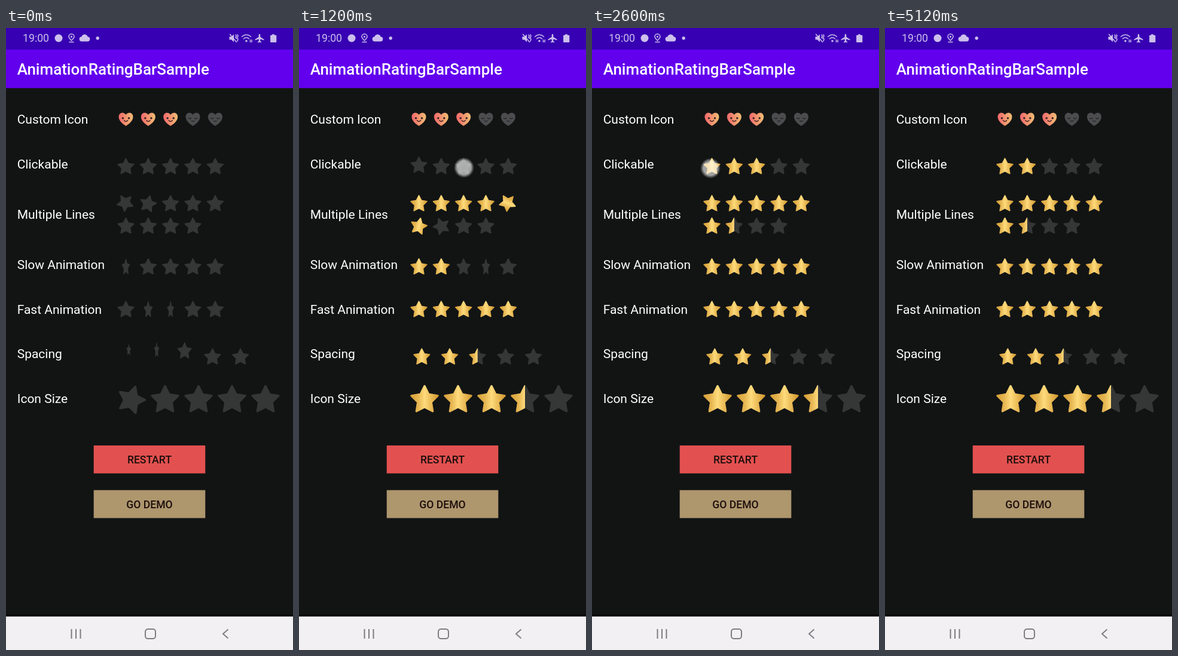
An HTML page that plays this animation: 480x1040 px, repeating every 5160 ms.

```html
<!DOCTYPE html>
<html lang="en">
<head>
<meta charset="utf-8">
<title>Rating bars</title>
<style>
html, body { margin: 0; width: 100%; height: 100%; overflow: hidden; background: #121414; }
svg { display: block; width: 480px; height: 1040px; }
text { font-family: Roboto, "Noto Sans", sans-serif; fill: #fff; }
.label { font-size: 21px; }
.title { font-size: 26px; font-weight: 500; }
.button { font-size: 17.6px; font-weight: 500; fill: #1c0e0c; text-anchor: middle; }
.clock { font-size: 17.7px; fill: #cdbfec; }
</style>
</head>
<body>
<svg id="stage" viewBox="0 0 480 1040">
  <defs>
    <linearGradient id="gold">
      <stop offset="0" stop-color="#d9a23a"/>
      <stop offset=".25" stop-color="#e5b550"/>
      <stop offset=".5" stop-color="#ffdb7c"/>
      <stop offset=".75" stop-color="#e9bb56"/>
      <stop offset="1" stop-color="#d39a32"/>
    </linearGradient>
    <linearGradient id="warm">
      <stop offset="0" stop-color="#f2686c"/>
      <stop offset="1" stop-color="#f0bd72"/>
    </linearGradient>
    <radialGradient id="glow">
      <stop offset="0" stop-color="#fff" stop-opacity=".58"/>
      <stop offset=".68" stop-color="#fff" stop-opacity=".62"/>
      <stop offset=".78" stop-color="#fff" stop-opacity=".42"/>
      <stop offset="1" stop-color="#fff" stop-opacity="0"/>
    </radialGradient>
    <clipPath id="half"><rect x="-20" y="-20" width="20" height="40"/></clipPath>
    <path id="heart" d="M0 11.5C-3.5 9.5-12 3.5-12-3.8C-12-8-9-10.5-6-10.5C-3.3-10.5-1.2-9.2 0-7.2C1.2-9.2 3.3-10.5 6-10.5C9-10.5 12-8 12-3.8C12 3.5 3.5 9.5 0 11.5Z"/>
    <g id="awake">
      <use href="#heart" fill="url(#warm)"/>
      <g fill="#3a2024"><circle cx="-5" cy="-1.6" r="1.7"/><circle cx="5" cy="-1.6" r="1.7"/></g>
      <path d="M-3 2.2Q0 5.8 3 2.2" fill="none" stroke="#3a2024" stroke-width="1.4" stroke-linecap="round"/>
    </g>
    <g id="asleep">
      <use href="#heart" fill="#4c4c4f"/>
      <path d="M-7.2-1.6Q-5 .4-2.8-1.6M2.8-1.6Q5 .4 7.2-1.6M-2.2 3Q0 4.8 2.2 3" fill="none" stroke="#222324" stroke-width="1.2" stroke-linecap="round"/>
    </g>
  </defs>

  <rect width="480" height="1040" fill="#121414"/>
  <rect width="480" height="36" fill="#3700b3"/>
  <rect y="36" width="480" height="64.5" fill="#6200ee"/>
  <text class="title" x="18.7" y="78">AnimationRatingBarSample</text>

  <text class="clock" x="28" y="23.3">19:00</text>
  <g fill="#cdbfec">
    <circle cx="88" cy="17" r="6.5"/>
    <path d="M127 22.5a4 4 0 0 1-.6-8a5.4 5.4 0 0 1 10.2 0a4 4 0 0 1-.6 8Z"/>
    <circle cx="153.2" cy="17" r="2.7"/>
    <path d="M373.5 14.5h3.5l4-4v13l-4-4h-3.5Z"/>
    <path d="M424 10c1 0 1.3 1 1.3 2v3l6.2 4v1.6l-6.2-2v3.4l1.8 1.4v1.2l-3.1-.9l-3.1.9v-1.2l1.8-1.4v-3.4l-6.2 2v-1.6l6.2-4v-3c0-1 .3-2 1.3-2Z"/>
    <path d="M445 10.500h4v1.500h2.500q.8 0 .8.800v10.400q0 .8-.8.800h-8.600q-.8 0-.8-.8v-10.400q0-.8.8-.800h2.100Z"/>
    <circle cx="402" cy="21.800" r="1.700"/>
    <circle cx="109.500" cy="14.500" r="1.500"/>
  </g>
  <g fill="none" stroke="#cdbfec" stroke-width="1.500" stroke-linecap="round">
    <path d="M109.500 21C106 17.500 105 16 105 14.500a4.500 4.500 0 0 1 9 0C114 16 113 17.500 109.500 21ZM106 23.500h7"/>
    <path d="M374.500 10.500l11 13M384 11.500l1.500 2l-1.500 2l1.500 2M387 11l1 2l-1 3l1 3l-1 3"/>
    <path d="M394.500 14.500q7.500-6.500 15 0M397.500 18q4.500-4 9 0M408.500 20v3.500M411 20v3.500" />
  </g>

  <g id="labels"></g>
  <g id="icons"></g>

  <rect x="146.700" y="698" width="186.600" height="46.700" fill="#e25150"/>
  <text class="button" x="240" y="728">RESTART</text>
  <rect x="146.700" y="772.700" width="186.600" height="46.700" fill="#ae966d"/>
  <text class="button" x="240" y="802.600">GO DEMO</text>

  <rect y="980" width="480" height="4" fill="#0c080d"/>
  <rect y="984" width="480" height="56" fill="#f2f0f3"/>
  <g fill="none" stroke="#7d7d80" stroke-width="2">
    <path d="M109.500 1005v16M117 1005v16M124.500 1005v16M371.500 1005.500l-8.500 7.500l8.500 7.500"/>
    <rect x="233" y="1005" width="17" height="16" rx="4.500"/>
  </g>
  <circle id="touch" r="17" fill="url(#glow)"/>
</svg>
<script>
const LOOP = 5160, STEP = 40;
const { PI, sin, cos, min, max, floor } = Math;
const clamp = v => min(1, max(0, v));
const smooth = p => 0.5 - 0.5 * cos(PI * clamp(p));
const byId = id => document.getElementById(id);

function add(parent, tag, attrs, text) {
  const el = document.createElementNS('http://www.w3.org/2000/svg', tag);
  for (const key in attrs) el.setAttribute(key, attrs[key]);
  if (text) el.textContent = text;
  parent.append(el);
  return el;
}

// Each effect maps the time since a star's start to its pose.
const effects = {
  spin(e) {
    if (e >= 1000) return { gold: true };
    return { turn: 360 * ((e % 500) / 500) ** 3, gold: e > 500 };
  },
  spinOnce(e) {
    return { turn: 360 * clamp(e / 440) ** 3, gold: e > 260 };
  },
  flip(e, span) {
    return { width: Math.abs(cos(PI * clamp(e / span))), gold: e > span };
  },
  jump(e) {
    const dip = sin(PI * clamp((e - 170) / 320)) ** 2;
    const pop = sin(PI * clamp((e - 810) / 200));
    return {
      lift: 11.5 * (smooth(e / 170) - smooth((e - 810) / 110)),
      width: Math.abs(cos(PI * clamp((e - 50) / 450))),
      scale: 1 - 0.3 * dip + 0.27 * pop,
      gold: e > 830
    };
  }
};

const rows = [
  { y: 231, effect: 'jump', delay: 200, taps: true },
  { y: 293, count: 9, rating: 6.5, effect: 'spin', start: -340, delay: 175 },
  { y: 398.7, rating: 5, effect: 'flip', start: -295, delay: 400, span: 860 },
  { y: 470, rating: 5, effect: 'flip', start: -225, delay: 70, span: 230 },
  { y: 549.2, x: 205.3, gap: 46.7, rating: 2.5, effect: 'jump', start: -330, delay: 100 },
  { y: 620, x: 210, gap: 56, size: 1.68, rating: 3.5, effect: 'spinOnce', start: -160, delay: 200 }
];

const taps = [
  { at: 1150, x: 276, y: 233.5, rating: 3 },
  { at: 2640, x: 198, y: 234.5, rating: 1 },
  { at: 3885, x: 240.5, y: 229.5, rating: 2 }
];

const starPath = 'M' + Array.from({ length: 10 }, (_, i) => {
  const r = i % 2 ? 7 : 13.8, a = i * PI / 5;
  return (r * sin(a)).toFixed(2) + ' ' + (1.2 - r * cos(a)).toFixed(2);
}).join('L') + 'Z';

function makeStar(row, i) {
  const { x = 200.5, gap = 37.35 } = row;
  const g = add(byId('icons'), 'g', {});
  const shape = (parent, paint) => add(parent, 'path', {
    d: starPath, fill: paint, stroke: paint, 'stroke-width': 2, 'stroke-linejoin': 'round'
  });
  shape(g, '#353636');
  const clip = row.rating - i === 0.5 ? { 'clip-path': 'url(#half)' } : {};
  const gold = add(g, 'g', clip);
  shape(gold, 'url(#gold)');
  return { row, i, g, gold, x: x + gap * (i % 5), y: row.y + 37.5 * floor(i / 5) };
}

const labels = [
  ['Custom Icon', 160], ['Clickable', 235], ['Multiple Lines', 319], ['Slow Animation', 403],
  ['Fast Animation', 477.5], ['Spacing', 552], ['Icon Size', 627]
];
for (const [text, y] of labels) add(byId('labels'), 'text', { class: 'label', x: 18.7, y }, text);

for (let i = 0; i < 5; i++) {
  add(byId('icons'), 'use', {
    href: i < 3 ? '#awake' : '#asleep', transform: `translate(${200.5 + 37.35 * i} 152.3)`
  });
}

const stars = rows.flatMap(row => Array.from({ length: row.count || 5 }, (_, i) => makeStar(row, i)));
const touch = byId('touch');

function poseOf({ row, i }, t) {
  const run = row.taps ? taps.findLast(tap => t >= tap.at) : row;
  if (!run || i >= run.rating) return {};
  const e = t - (row.taps ? run.at : run.start) - i * row.delay;
  return e > 0 ? effects[row.effect](e, row.span) : {};
}

function draw(t) {
  for (const star of stars) {
    const { turn = 0, width = 1, scale = 1, lift = 0, gold = false } = poseOf(star, t);
    const s = scale * (star.row.size || 1);
    star.g.setAttribute('transform',
      `translate(${star.x} ${star.y - lift}) rotate(${turn}) scale(${s * max(width, 0.04)} ${s})`);
    star.gold.setAttribute('visibility', gold ? 'visible' : 'hidden');
  }
  const tap = taps.find(p => t >= p.at - 80 && t < p.at + 75);
  touch.setAttribute('visibility', tap ? 'visible' : 'hidden');
  if (tap) touch.setAttribute('transform', `translate(${tap.x} ${tap.y})`);
}

const begin = performance.now();
function tick() {
  const t = (performance.now() - begin) % LOOP;
  draw(floor(t / STEP) * STEP);
  requestAnimationFrame(tick);
}
tick();
</script>
</body>
</html>
```
